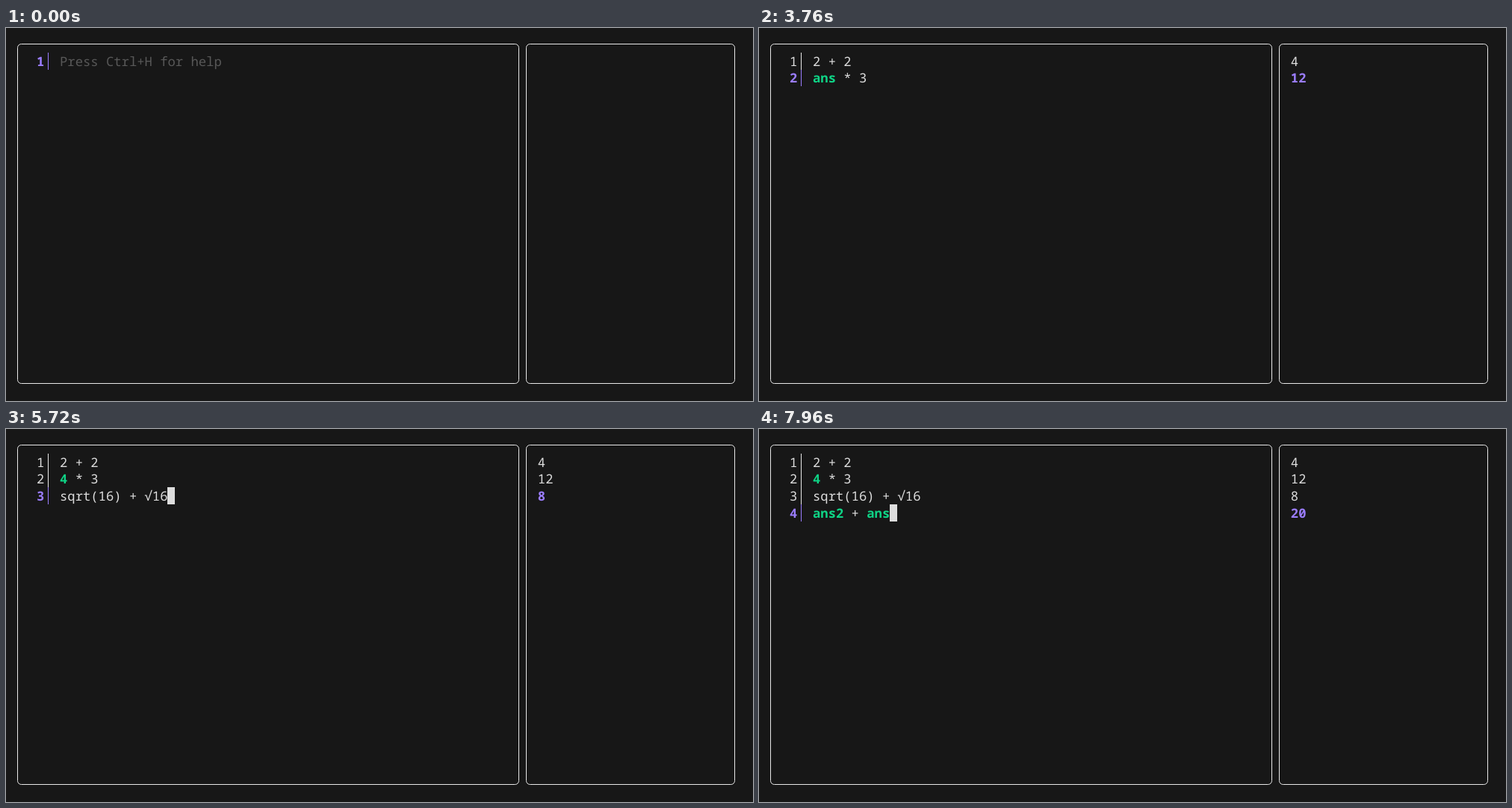
An HTML page with a canvas that plays this animation: 1000x500 px, repeating every 8000 ms.

```html
<!DOCTYPE html>
<html lang="en">
<head>
<meta charset="utf-8">
<title>Line calculator</title>
<style>
html, body { margin: 0; width: 100%; height: 100%; overflow: hidden; background: #171717; }
canvas { display: block; width: 1000px; height: 500px; }
</style>
</head>
<body>
<canvas id="stage" width="1000" height="500"></canvas>
<script>
const ctx = document.getElementById('stage').getContext('2d');
const LOOP = 8000, TICK = 40;
const CELL = 10.32, ROW = 22.7, LEFT = 72, TOP = 33, OUT = 62;
const FONT = '17.2px "Noto Sans Mono", "DejaVu Sans Mono", monospace';
const COLOR = {
  back: '#171717', text: '#dddddd', frame: '#e8e8e8',
  dim: '#585858', active: '#9b7dff', answer: '#0fd486'
};

// Each line opens, is typed from first to last, then blinks at the listed times.
const lines = [
  { open: 0, first: 1000, last: 1160, text: '2 + 2', blinks: [0, 160, 680, 1000, 1680, 2200],
    results: { '2': '2', '2 + 2': '4' } },
  { open: 2400, first: 2960, last: 3240, text: 'ans * 3', settled: '4 * 3', blinks: [2920, 2960, 3760, 4280],
    results: { 'ans': '4', 'ans * 3': '12' } },
  { open: 4480, first: 5000, last: 5720, text: 'sqrt(16) + √16', blinks: [4960, 5000, 6240, 6760],
    results: { 'sqrt(16)': '4', 'sqrt(16) + √1': '5', 'sqrt(16) + √16': '8' } },
  { open: 6960, first: 7480, last: 7960, text: 'ans2 + ans', blinks: [7440, 7480],
    results: { 'ans': '8', 'ans2': '12', 'ans2 + ans': '20' } }
];

const colX = col => LEFT + col * CELL;
const rowY = row => Math.round(TOP + row * ROW);

function write(text, col, row, color, bold) {
  ctx.font = (bold ? 'bold ' : '') + FONT;
  ctx.fillStyle = color;
  [...text].forEach((ch, i) => ctx.fillText(ch, colX(col + i), TOP + row * ROW + 17.6));
}

function panel(x, right) {
  ctx.strokeStyle = COLOR.frame;
  ctx.lineWidth = 1;
  ctx.beginPath();
  ctx.roundRect(x + 0.5, 21.5, right - x, 455, 5);
  ctx.stroke();
}

function typedCount(line, t) {
  if (t < line.first) return 0;
  const step = (line.last - line.first) / (line.text.length - 1);
  let n = 0;
  while (n < line.text.length && Math.round((line.first + n * step) / TICK) * TICK <= t) n++;
  return n;
}

function writeCode(text, row, settled) {
  const token = settled ? /^4/g : /ans\d*/g;
  let end = 0;
  for (const m of text.matchAll(token)) {
    write(text.slice(end, m.index), end, row, COLOR.text);
    write(m[0], m.index, row, COLOR.answer, true);
    end = m.index + m[0].length;
  }
  write(text.slice(end), end, row, COLOR.text);
}

function cursor(col, row, under) {
  ctx.fillStyle = COLOR.text;
  ctx.fillRect(Math.round(colX(col)), rowY(row), 10, rowY(row + 1) - rowY(row));
  if (under) write(under, col, row, COLOR.back);
}

function drawLine(line, row, t, active) {
  const color = active ? COLOR.active : COLOR.text;
  write(String(row + 1), -3, row, color, active);
  ctx.fillStyle = active ? COLOR.active : COLOR.frame;
  ctx.fillRect(56, rowY(row), 1, rowY(row + 1) - rowY(row));

  const count = typedCount(line, t);
  const typed = line.text.slice(0, count);
  const hint = row === 0 && count === 0 ? 'Press Ctrl+H for help' : '';
  if (hint) write(hint, 0, row, COLOR.dim);
  else writeCode(!active && line.settled || typed, row, !active && line.settled);

  write(line.results[typed.trim()] || '', OUT, row, color, active);
  const lit = line.blinks.filter(b => b <= t).length % 2 === 0;
  if (active && lit) cursor(count, row, hint[0]);
}

function draw(t) {
  ctx.fillStyle = COLOR.back;
  ctx.fillRect(0, 0, 1000, 500);
  panel(15, 686);
  panel(696, 975);
  const shown = lines.filter(line => line.open <= t);
  shown.forEach((line, row) => drawLine(line, row, t, row === shown.length - 1));
}

ctx.textBaseline = 'alphabetic';
ctx.textRendering = 'geometricPrecision';
const start = performance.now();
function frame() {
  draw((performance.now() - start) % LOOP);
  requestAnimationFrame(frame);
}
frame();
</script>
</body>
</html>
```
